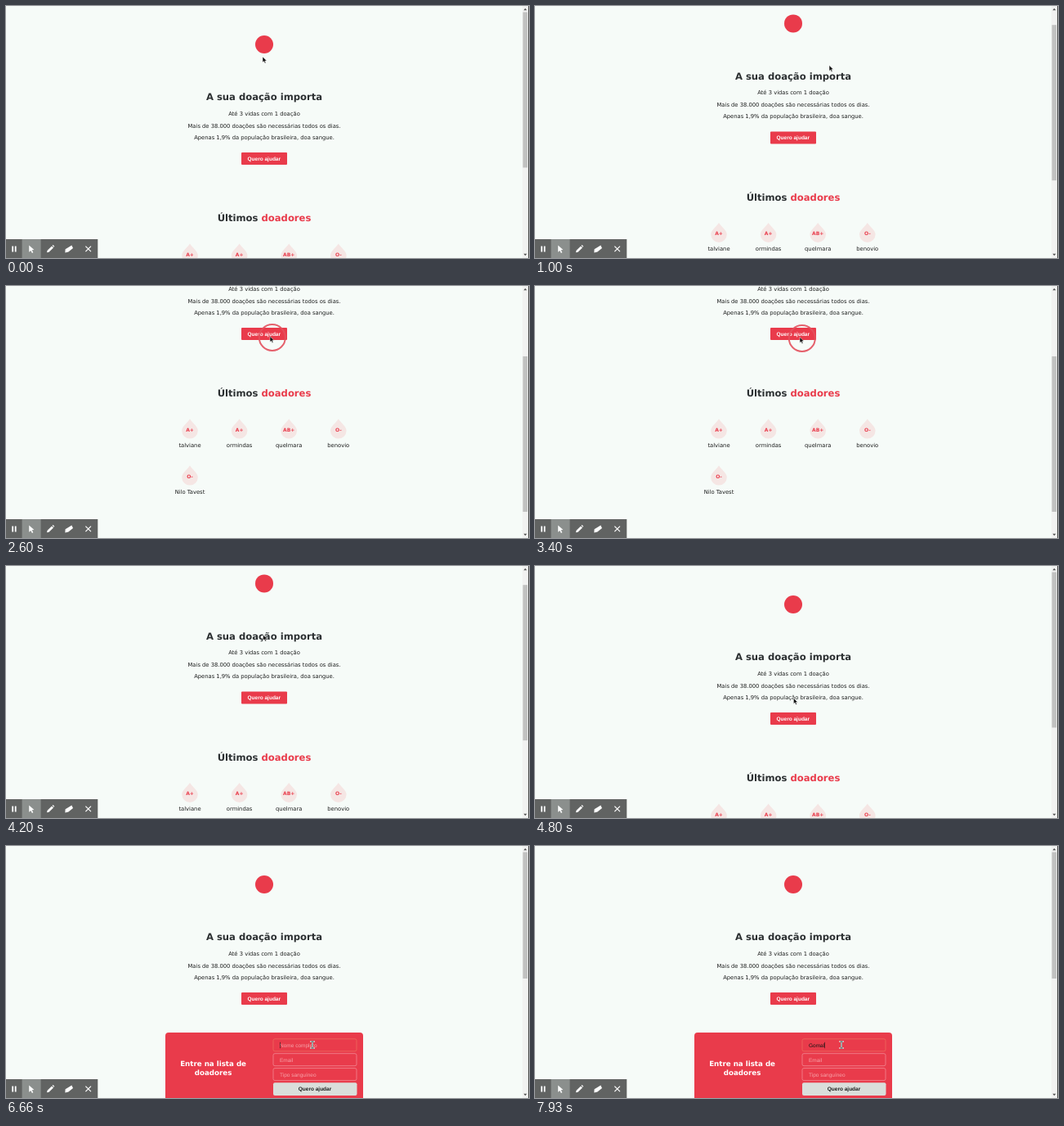
These frames come from a looping animation (640x308 px, 8000 ms). An HTML page:

```html
<!DOCTYPE html>
<html lang="pt">
<head>
<meta charset="utf-8">
<title>Doadores</title>
<style>
  html, body { margin: 0; width: 100%; height: 100%; overflow: hidden; background: #f6fbf8; }
  svg { display: block; width: 640px; height: 308px; text-rendering: geometricPrecision; }
  text { font: 6.77px "DejaVu Sans", sans-serif; fill: #1c1d1d; }
  .mid text, text.mid { text-anchor: middle; }
  text.title { font-size: 11.6px; font-weight: bold; fill: #2c3032; }
  text.type { font-size: 6px; font-weight: bold; fill: #e93b4b; }
  text.call { font-size: 8.7px; font-weight: bold; fill: #fff; }
  text.btn { font: bold 6.5px "Liberation Sans", Arial, sans-serif; }
  text.field { font: 6.5px "Liberation Sans", Arial, sans-serif; fill: #f6a3aa; }
  .red { fill: #e93b4b; }
</style>
</head>
<body>
<svg viewBox="0 0 640 308">
  <rect width="640" height="308" fill="#f6fbf8"/>
  <g id="page">
    <circle class="red" cx="316" cy="47" r="11"/>
    <g class="mid">
      <text class="title" x="316" y="115.2">A sua doação importa</text>
      <text x="316" y="134">Até 3 vidas com 1 doação</text>
      <text x="316" y="148.5">Mais de 38.000 doações são necessárias todos os dias.</text>
      <text x="316" y="163">Apenas 1,9% da população brasileira, doa sangue.</text>
    </g>
    <rect class="red" x="288" y="179" width="56" height="15" rx="1"/>
    <text class="btn mid" x="315.8" y="188.8" style="fill:#fff">Quero ajudar</text>

    <g id="form">
      <rect class="red" x="195" y="228" width="242" height="85" rx="4"/>
      <text class="call mid" x="253.6" y="269.4">Entre na lista de</text>
      <text class="call mid" x="253.6" y="279.6">doadores</text>
      <g id="fields"></g>
      <rect x="327" y="289.3" width="102.5" height="15.6" rx="2" fill="#dadfdb"/>
      <text class="btn mid" x="378" y="299.3">Quero ajudar</text>
      <rect id="caret" y="239.8" width="0.6" height="7.4" fill="#111"/>
    </g>

    <g id="list">
      <text class="title mid" x="316" y="263.4">Últimos <tspan class="red">doadores</tspan></text>
    </g>
  </g>

  <rect x="632" width="7.2" height="308" fill="#f1f2f1"/>
  <rect x="639.2" width="0.8" height="308" fill="#2a2a2a"/>
  <rect id="thumb" x="632.5" width="5.6" fill="#c1c2c1"/>
  <path d="M633.4 5.2L635.4 2.8L637.4 5.2ZM633.4 302.8L635.4 305.2L637.4 302.8Z" fill="#555"/>

  <g id="bar">
    <rect y="285" width="112.3" height="23" fill="#616362"/>
    <rect x="19.6" y="285" width="23" height="23" fill="#8b8f8d"/>
    <g fill="#fff">
      <path d="M7.3 293.6H9.1V300.4H7.3ZM10.8 293.6H12.6V300.4H10.8Z"/>
      <path d="M28.2 292.4L34.4 298L31.7 298.2L33.3 301.3L31.9 302L30.4 298.9L28.2 300.7Z"/>
      <path d="M50 301.3L50.6 298.8L56 293.4L58 295.4L52.6 300.8ZM56.6 292.8L57.6 292L59.3 293.7L58.6 294.7Z"/>
      <path d="M72.6 297.2L80.4 292.6L82 296L76.4 300.6L72.4 301.4Z"/>
    </g>
    <path d="M97.4 293.6L104 300.2M104 293.6L97.4 300.2" stroke="#fff" stroke-width="1.2"/>
  </g>

  <circle id="ring" r="16" fill="none" stroke="#e4505e" stroke-width="2"/>
  <path id="arrow" d="M0 0L0 7L1.6 5.5L2.8 8.1L4 7.5L2.9 5.1L5.1 5Z" fill="#111" stroke="#fff" stroke-width="0.6" stroke-opacity="0.8"/>
  <g id="beam" fill="none" stroke-linecap="square">
    <path id="beamShape" d="M-1.6 -4H1.6M0 -4V4M-1.6 4H1.6" stroke="#f4f4f4" stroke-width="2"/>
    <path d="M-1.6 -4H1.6M0 -4V4M-1.6 4H1.6" stroke="#333" stroke-width="0.8"/>
  </g>
</svg>
<script>
const LOOP = 8000, NOTCH = 25.6, NOTCH_MS = 130, FORM_SHIFT = 111;
const WORD = "Gomal";
const $ = id => document.getElementById(id);

function add(parent, tag, attrs, text) {
  const el = document.createElementNS("http://www.w3.org/2000/svg", tag);
  for (const k in attrs) el.setAttribute(k, attrs[k]);
  if (text) el.textContent = text;
  return parent.appendChild(el);
}

const donors = [["A+", "talviane"], ["A+", "ormindas"], ["AB+", "quelmara"],
                ["O-", "benovio"], ["O-", "Nilo Tavest"]];
donors.forEach(([type, name], i) => {
  const x = 225 + (i % 4) * 60.6, y = 302.5 + Math.floor(i / 4) * 57;
  add($("list"), "path", {
    d: "M0-12C3-7 9.8-3 9.8 2.2A9.8 9.8 0 0 1-9.8 2.2C-9.8-3-3-7 0-12Z",
    transform: `translate(${x} ${y})`, fill: "#f5e6e4"
  });
  add($("list"), "text", { class: "type mid", x, y: y + 3.2 }, type);
  add($("list"), "text", { class: "mid", x, y: y + 22.3 }, name);
});

const fields = ["Nome completo", "Email", "Tipo sanguíneo"].map((label, i) => {
  const y = 235.8 + i * 17.9;
  const box = add($("fields"), "rect", {
    x: 327, y, width: 102, height: 15, rx: 2, fill: "none", stroke: "#f28a94", "stroke-width": 0.8
  });
  const text = add($("fields"), "text", { class: "field", x: 335, y: y + 9.9 }, label);
  return { box, text, label };
});

// Wheel notches: start time and direction
const notches = [[830, 1], [1130, 1], [1480, 1], [1740, 1], [1960, 1],
                 [3480, -1], [3640, -1], [3800, -1], [3960, -1], [4230, -1]];
// Pointer moves: start, end, x, y
const moves = [[60, 530, 360, 72.5], [2060, 2480, 323, 61.5], [3330, 3400, 324, 62.5],
               [3800, 4180, 314.5, 84], [4420, 4980, 317, 186], [5160, 5400, 379, 214],
               [5420, 5860, 377, 236], [6130, 6400, 375, 243]];
const clicks = [[2530, 2790], [3330, 3580], [5040, 5260]];
const opened = [[2670, 3390], [5130, LOOP]];
const keys = [7060, 7260, 7460, 7660, 7860];
const FOCUS = 6400;

const clamp = v => Math.max(0, Math.min(1, v));
const ease = v => v * v * (3 - 2 * v);
const part = (t, a, b) => ease(clamp((t - a) / (b - a)));
const within = (t, spans) => spans.find(([a, b]) => t >= a && t < b);
const show = (el, on) => el.setAttribute("visibility", on ? "inherit" : "hidden");
const place = (el, x, y) => el.setAttribute("transform", `translate(${x} ${y})`);

function pointer(t) {
  let x = 314, y = 62;
  for (const [a, b, tx, ty] of moves) {
    const k = part(t, a, b);
    x += (tx - x) * k;
    y += (ty - y) * k;
  }
  return [x, y];
}

function draw(t) {
  const scroll = notches.reduce((s, [a, dir]) => s + dir * NOTCH * part(t, a, a + NOTCH_MS), 0);
  const open = !!within(t, opened);
  place($("page"), 0, -scroll);
  show($("form"), open);
  place($("list"), 0, open ? FORM_SHIFT : 0);
  $("thumb").setAttribute("y", 7.5 + scroll * (open ? 0.5 : 0.613));
  $("thumb").setAttribute("height", open ? 154.5 : 190);

  const [x, y] = pointer(t);
  const inField = t >= 6230;
  show($("arrow"), !inField);
  show($("beam"), inField);
  place($("arrow"), x, y);
  place($("beam"), x, y);

  const click = within(t, clicks);
  show($("ring"), click);
  if (click) {
    place($("ring"), x + 2.8, y + 1.5);
    $("ring").setAttribute("opacity", 0.9 * (1 - part(t, click[1] - 90, click[1])));
  }

  const typed = WORD.slice(0, keys.filter(k => t >= k).length);
  const focused = t >= FOCUS;
  const first = fields[0];
  first.text.textContent = typed || first.label;
  first.text.style.fill = typed ? "#151515" : "";
  first.box.setAttribute("stroke", focused ? "#ee6a5e" : "#f28a94");
  show($("caret"), focused);
  $("caret").setAttribute("x", 335.2 + (typed ? first.text.getComputedTextLength() : 0));
}

function tick() {
  draw(performance.now() % LOOP);
  requestAnimationFrame(tick);
}
tick();
</script>
</body>
</html>
```
